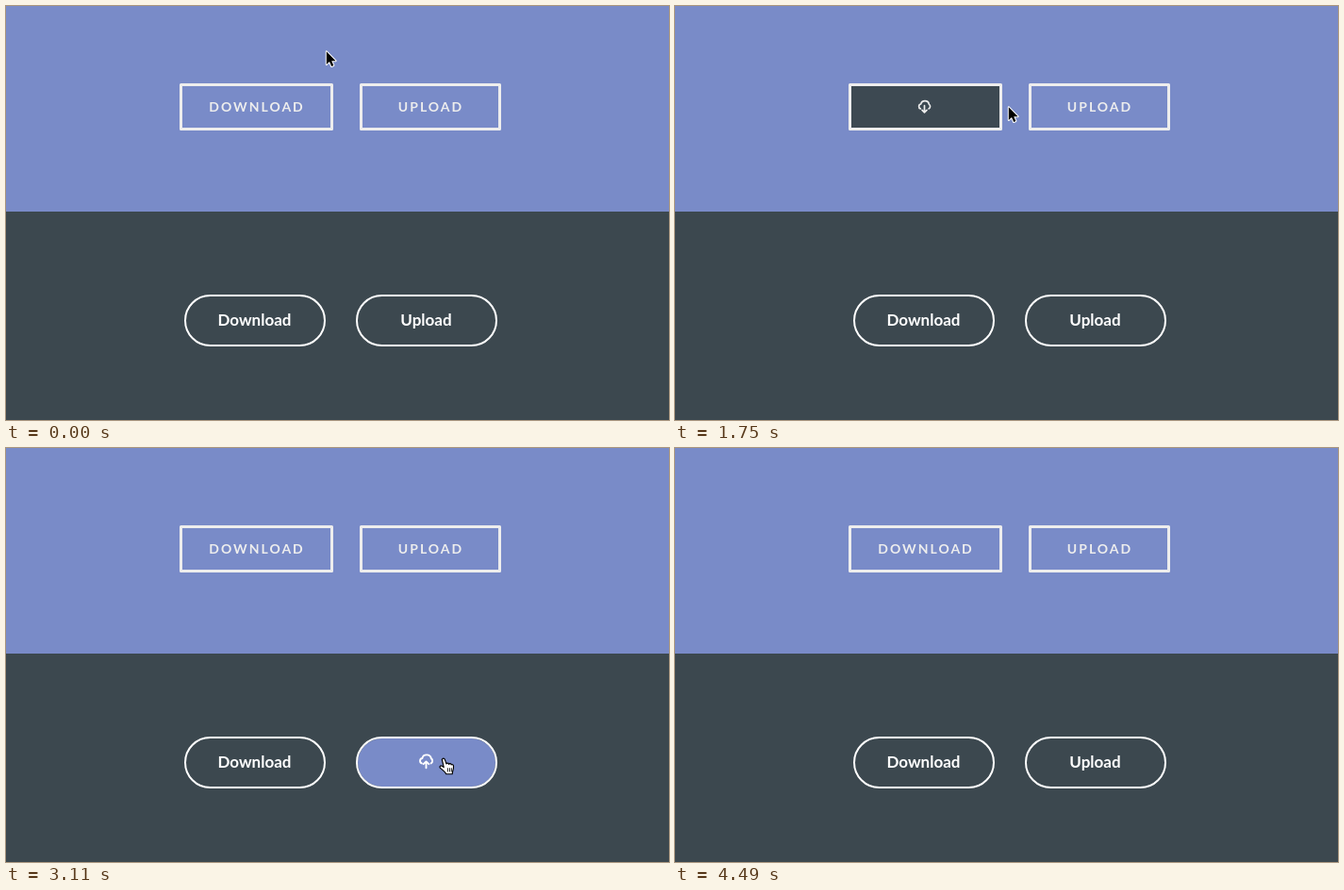
An HTML page with a canvas for the animation above (5280 ms loop, 703 by 439 pixels).

```html
<!DOCTYPE html>
<html lang="en">
<head>
<meta charset="utf-8">
<title>Button hover</title>
<style>
html, body { margin: 0; width: 100%; height: 100%; overflow: hidden; background: #3c484f; }
canvas { display: block; }
</style>
</head>
<body>
<canvas id="stage" width="703" height="439"></canvas>
<script>
const ctx = document.getElementById("stage").getContext("2d");
const LOOP = 5280, FADE = 280, TRAVEL = 50;
const BLUE = "#798bc8", DARK = "#3c484f", PALE = "#ededed";

const square = { border: 3, radius: 0, color: PALE, fill: DARK, font: "700 14px Lato, sans-serif", spacing: 2, iconScale: 1 };
const pill = { border: 2, radius: 27.5, color: "#fff", fill: BLUE, font: "700 17px Lato, sans-serif", spacing: 0, iconScale: 1.1 };
const buttons = [
  { x: 184, y: 82, w: 163, h: 50, label: "DOWNLOAD", textX: 265, baseline: 112, iconX: 264.5, iconY: 105.5, look: square },
  { x: 375, y: 82, w: 150, h: 50, label: "UPLOAD", textX: 449.5, baseline: 112, iconX: 448.5, iconY: 105.5, up: true, look: square },
  { x: 371, y: 306, w: 150, h: 55, label: "Upload", textX: 445.5, baseline: 339, iconX: 445.5, iconY: 332, up: true, look: pill },
  { x: 189, y: 306, w: 150, h: 55, label: "Download", textX: 263.5, baseline: 339, iconX: 263.5, iconY: 332, look: pill }
];

// Pointer moves: start, end, target x, target y, easing
const smooth = p => (1 - Math.cos(Math.PI * p)) / 2;
const slowing = p => 1 - (1 - p) ** 1.3;
const origin = [339, 47];
const moves = [
  [10, 105, 314, 54, slowing],
  [590, 920, 290, 107, smooth],
  [1580, 1960, 440, 104, smooth],
  [2390, 2660, 454, 277, smooth],
  [2660, 2960, 464, 329, slowing],
  [3380, 3760, 261, 331, smooth],
  [4140, 4385, 358, 446, smooth]
];

const cloud = new Path2D("M-4.2 2.2C-6.6 1.4 -6.4 -2.5 -3.7 -2.7C-3 -7 4 -7.2 4.8 -2.6C6.7 -1.3 6.3 1.6 4.6 2.2");
const downArrow = new Path2D("M0 -1V6M-2.5 3.6L0 6.1L2.5 3.6");
const upArrow = new Path2D("M0 6.6V.6M-2.6 2.9L0 .4L2.6 2.9");
const arrow = new Path2D("M.8 1.2V15L4 12L6.2 17L8.4 16L6.2 11.2H10.6Z");
const hand = new Path2D("M-1.6 .4C-1 -1 .8 -1 1.3 .5L2.8 4.6C3.4 3.6 5 3.8 5.3 5C6 4 7.6 4.4 7.8 5.5C8.6 4.8 10 5.4 10 6.8C10.3 9.5 9.6 11 9 12.5L8.8 14.5H2.6C2 12.8 -1 10.5 -3.4 8.6C-4.6 7.4 -3 6 -1.6 6.8L.2 8Z");
const fingers = new Path2D("M4.2 9V12M6.2 9V12M8 9V12");

const clamp = v => Math.min(1, Math.max(0, v));

// CSS "ease": cubic-bezier(.25, .1, .25, 1)
function ease(x) {
  if (x <= 0 || x >= 1) return clamp(x);
  const curve = (a, b, s) => 3 * a * s * (1 - s) ** 2 + 3 * b * s * s * (1 - s) + s ** 3;
  let lo = 0, hi = 1;
  for (let i = 0; i < 20; i++) {
    const mid = (lo + hi) / 2;
    if (curve(.25, .25, mid) < x) lo = mid; else hi = mid;
  }
  return curve(.1, 1, lo);
}

function pointerAt(t) {
  let [x, y] = origin;
  for (const [start, end, toX, toY, easing] of moves) {
    if (t < start) break;
    const p = easing(clamp((t - start) / (end - start)));
    x += (toX - x) * p;
    y += (toY - y) * p;
  }
  return { x, y };
}

const inside = (b, p) => p.x >= b.x && p.x < b.x + b.w && p.y >= b.y && p.y < b.y + b.h;

for (const b of buttons) {
  const times = [];
  for (let t = 0; t < LOOP; t += 5) if (inside(b, pointerAt(t))) times.push(t);
  b.enter = times[0];
  b.leave = times[times.length - 1];
}

function roundBox(b, inset) {
  ctx.beginPath();
  ctx.roundRect(b.x + inset, b.y + inset, b.w - 2 * inset, b.h - 2 * inset, Math.max(0, b.look.radius - inset));
}

function drawIcon(b, dy) {
  ctx.save();
  ctx.translate(b.iconX, b.iconY + dy);
  ctx.scale(b.look.iconScale, b.look.iconScale);
  ctx.lineWidth = 1.7;
  ctx.stroke(cloud);
  ctx.stroke(b.up ? upArrow : downArrow);
  ctx.restore();
}

function drawButton(b, t) {
  const look = b.look;
  const hover = ease((t - b.enter) / FADE) - ease((t - b.leave) / FADE);
  ctx.save();
  roundBox(b, look.border);
  ctx.clip();
  if (hover > 0) {
    ctx.globalAlpha = hover;
    ctx.fillStyle = look.fill;
    ctx.fillRect(b.x, b.y, b.w, b.h);
    ctx.globalAlpha = 1;
  }
  ctx.fillStyle = ctx.strokeStyle = look.color;
  ctx.font = look.font;
  ctx.letterSpacing = look.spacing + "px";
  ctx.textAlign = "center";
  ctx.fillText(b.label, b.textX + look.spacing / 2, b.baseline - TRAVEL * hover);
  if (hover > 0) drawIcon(b, TRAVEL * (1 - hover));
  ctx.restore();

  ctx.strokeStyle = look.color;
  ctx.lineWidth = look.border;
  roundBox(b, look.border / 2);
  ctx.stroke();
}

function drawPointer(p) {
  ctx.save();
  ctx.translate(Math.round(p.x), Math.round(p.y));
  if (buttons.some(b => inside(b, p))) {
    ctx.translate(0, .8);
    ctx.scale(1.05, 1.1);
    ctx.fillStyle = "#fff";
    ctx.strokeStyle = "#000";
    ctx.lineWidth = 1.1;
    ctx.fill(hand);
    ctx.stroke(hand);
    ctx.lineWidth = .8;
    ctx.stroke(fingers);
  } else {
    ctx.strokeStyle = "#fff";
    ctx.lineWidth = 2;
    ctx.stroke(arrow);
    ctx.fillStyle = "#000";
    ctx.fill(arrow);
  }
  ctx.restore();
}

function draw(t) {
  ctx.fillStyle = BLUE;
  ctx.fillRect(0, 0, 703, 218);
  ctx.fillStyle = DARK;
  ctx.fillRect(0, 218, 703, 221);
  for (const b of buttons) drawButton(b, t);
  drawPointer(pointerAt(t));
}

ctx.lineCap = ctx.lineJoin = "round";
const start = performance.now();
function tick() {
  draw((performance.now() - start) % LOOP);
  requestAnimationFrame(tick);
}
tick();
</script>
</body>
</html>
```
